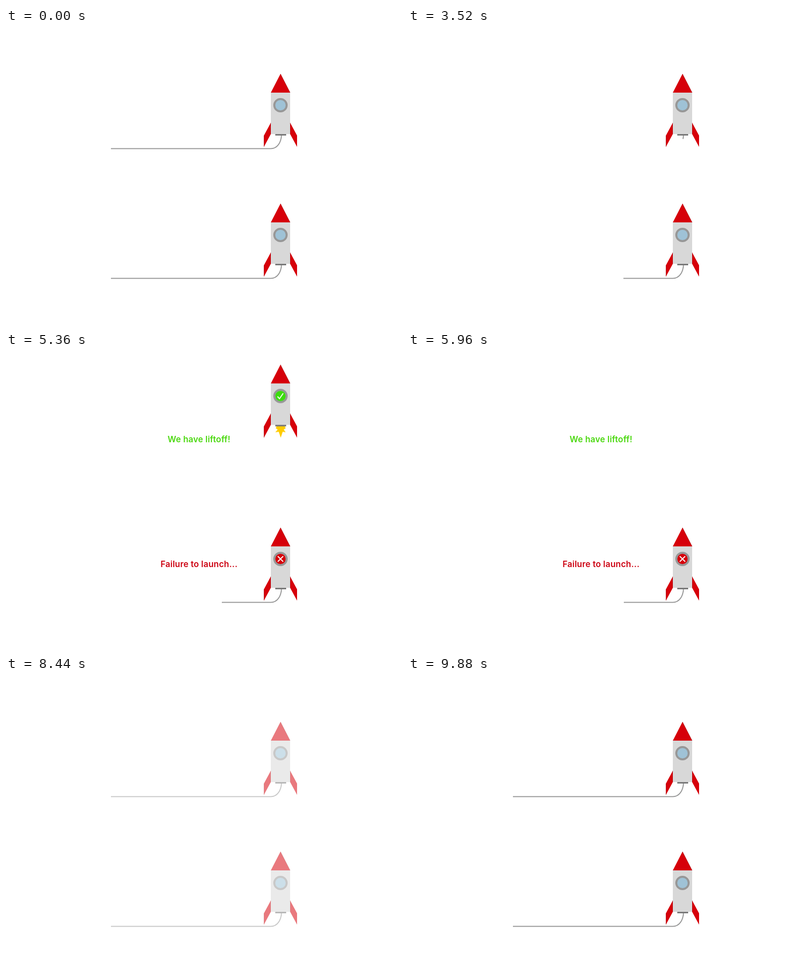
These frames come from a looping animation (800x600 px, 9.92 s). An HTML page:

```html
<!DOCTYPE html>
<html lang="en">
<head>
<meta charset="utf-8">
<title>Rocket launch</title>
<style>
  html, body { margin: 0; width: 100%; height: 100%; overflow: hidden; background: #fff; }
  svg { display: block; width: 100vw; height: 100vh; }

  .scene, .fuse, .result, .liftoff { animation: 9920ms linear infinite; }
  .scene { animation-name: scene; }
  .fuse {
    fill: none; stroke: #979797; stroke-width: 2;
    stroke-dasharray: 400 800;
    animation-name: burn;
  }
  .fuse.lit { --burnt: -355px; --after: hidden; }
  .fuse.dud { --burnt: -224px; --after: visible; }
  .result { animation-name: reveal; }
  .liftoff { animation-name: liftoff; }

  .mark { fill: none; stroke: #fff; stroke-width: 2; }
  text {
    font: 600 17px Inter, "Open Sans", sans-serif;
    letter-spacing: .2px; text-anchor: middle;
  }

  @keyframes scene {
    0%, 60.887% { opacity: 1; animation-timing-function: cubic-bezier(.28, .09, .31, .85); }
    68.952%, 81.75% { opacity: .022; }
    81.754% { opacity: 0; animation-timing-function: ease; }
    92.64%, 100% { opacity: 1; }
  }
  @keyframes burn {
    0%, 7.68% { stroke-dashoffset: 0; visibility: visible; animation-timing-function: ease; }
    37.9% { stroke-dashoffset: var(--burnt); visibility: visible; animation-timing-function: step-end; }
    37.91%, 81.85% { stroke-dashoffset: var(--burnt); visibility: var(--after); animation-timing-function: step-end; }
    81.855%, 100% { stroke-dashoffset: 0; visibility: visible; }
  }
  @keyframes reveal {
    0%, 37.903% { opacity: 0; animation-timing-function: ease; }
    40.323%, 81.85% { opacity: 1; }
    81.855%, 100% { opacity: 0; }
  }
  @keyframes liftoff {
    0%, 37.903% { transform: translateY(0); animation-timing-function: ease; }
    40.323%, 50.403% { transform: translateY(2px); animation-timing-function: ease-in; }
    58.468%, 81.85% { transform: translateY(-260px); }
    81.855%, 100% { transform: translateY(0); }
  }
</style>
</head>
<body>
<svg viewBox="0 0 800 600">
  <defs>
    <path id="fuse" d="M212 244.5H535C548 244.5 556 232 556.5 217"/>
    <g id="rocket">
      <path fill="#d6000a" d="M554.5 93L574 131H535ZM535 192L521 218V241L535 215ZM574 192L588 218V241L574 215Z"/>
      <path fill="none" stroke="#98000a" stroke-width=".6" d="M554.5 93L574 131M521.3 218V240.5M534.7 192.5V215M574.3 192.5V215"/>
      <path fill="#d8d8d8" d="M535 131H574V215H535Z"/>
      <path fill="#777" d="M544 215H566V218H544Z"/>
      <circle cx="554.5" cy="156.5" r="12.5" fill="#9fc2d6" stroke="#979797" stroke-width="4"/>
    </g>
    <circle id="pane" cx="554.5" cy="156.5" r="10.5"/>
  </defs>

  <g class="scene">
    <use href="#fuse" class="fuse lit"/>
    <g class="liftoff">
      <path class="result" fill="#fc0" d="M547 217H563L565 222L561 224.5L565 230L559 229L555 241L551 229L544 230L549 224.5L545 222Z"/>
      <use href="#rocket"/>
      <g class="result">
        <use href="#pane" fill="#3bdc0c"/>
        <path class="mark" d="M548.5 157.5L552.5 162L560 151"/>
      </g>
    </g>
    <text class="result" x="390" y="183" fill="#4bd80f">We have liftoff!</text>

    <g transform="translate(0 263)">
      <use href="#fuse" class="fuse dud"/>
      <use href="#rocket"/>
      <g class="result">
        <use href="#pane" fill="#d6000a"/>
        <path class="mark" d="M549 151L560 162M560 151L549 162"/>
      </g>
      <text class="result" x="390" y="173" fill="#cc0010">Failure to launch...</text>
    </g>
  </g>
</svg>
</body>
</html>
```
